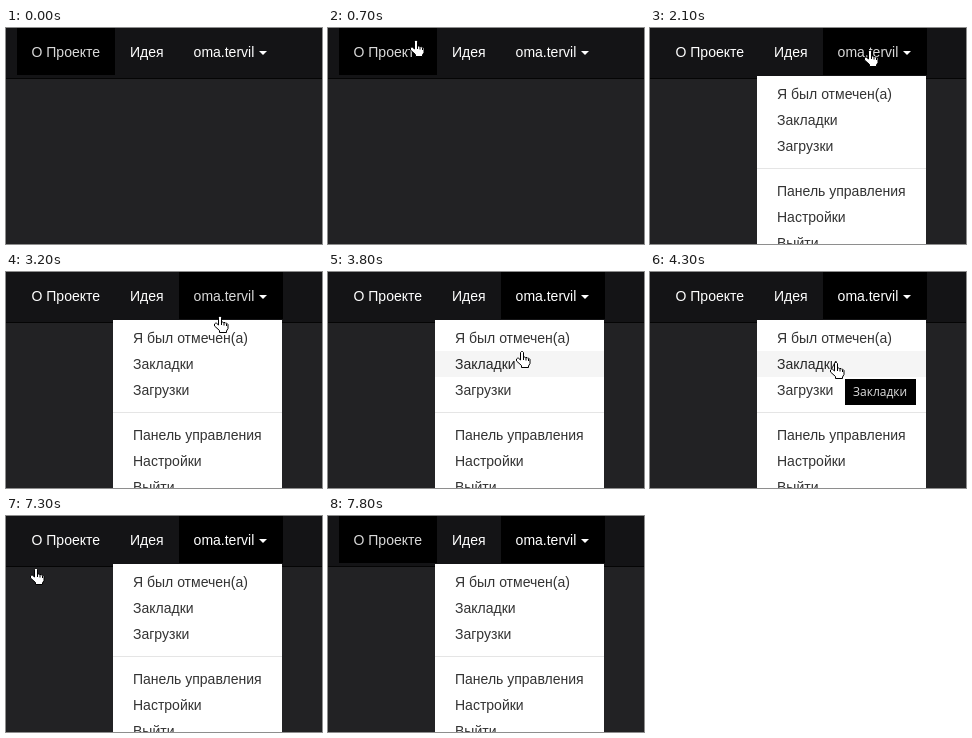
An HTML page for the animation above (8.2 s loop, 316 px wide and 216 px high).

```html
<!DOCTYPE html>
<html lang="ru">
<head>
<meta charset="utf-8">
<style>
html, body { margin: 0; width: 100%; height: 100%; overflow: hidden; background: #222224; }
svg { display: block; width: 100vw; height: 100vh; }
text { font: 14px "Liberation Sans", Arial, sans-serif; white-space: pre; }
.nav rect { fill: none; }
.nav text, .nav path { fill: #fff; }
.nav .on rect { fill: #000; }
.nav .hover text { fill: #d9d9d9; }
.menu rect { fill: #fff; }
.menu text { fill: #333; }
.menu .hover rect { fill: #f5f5f5; }
.menu .hover text { fill: #262626; }
#tip text { font: 12px "Open Sans", "Noto Sans", sans-serif; fill: #ddd; }
</style>
</head>
<body>
<svg viewBox="0 0 316 216">
  <rect width="316" height="50" fill="#141416"/>
  <rect y="50" width="316" height="1" fill="#050505"/>
  <g class="nav" id="nav"></g>
  <g class="menu" id="menu">
    <rect x="107" y="48" width="169" height="180"/>
    <path d="M107 140.5h169" stroke="#e5e5e5"/>
  </g>
  <g id="tip">
    <rect x="195" y="107" width="71" height="26"/>
    <text x="203" y="124">Закладки</text>
  </g>
  <g id="hand" stroke="#000">
    <path fill="#fff" d="M5.5 .5h1l1 1V6h1l1 .5H11l.7.7h1L14 8.5v4L12.5 15v1.5h-7v-2L.5 10V8l1-.8h1l2 1.8V1.5z"/>
    <path fill="none" d="M7.5 6v3M10 7v2.5M12.5 8v2"/>
  </g>
</svg>
<script>
const LOOP = 8200, STEP = 100, OPEN = 2100, TIP = 4300;
const $ = id => document.getElementById(id);

function addItem(parent, x, y, w, h, textX, baseline, label) {
  const g = document.createElementNS("http://www.w3.org/2000/svg", "g");
  g.innerHTML = `<rect x="${x}" y="${y}" width="${w}" height="${h}"/>
    <text x="${textX}" y="${baseline}">${label}</text>`;
  parent.append(g);
  return { g, has: (px, py) => px >= x && px < x + w && py < y + h && (py >= y || y === 0) };
}

const nav = [[11, 98, 25.5, "О Проекте"], [109, 64, 124, "Идея"], [173, 104, 187.6, "oma.tervil"]]
  .map(([x, w, textX, label]) => addItem($("nav"), x, 0, w, 47, textX, 29, label));
nav[2].g.insertAdjacentHTML("beforeend", '<path d="M253 23h8l-4 4z"/>');

const rows = [[53, "Я был отмечен(а)"], [79, "Закладки"], [105, "Загрузки"],
  [150, "Панель управления"], [176, "Настройки"], [202, "Выйти"]]
  .map(([y, label]) => addItem($("menu"), 107, y, 169, 26, 127, y + 18, label));

// Pointer route: time, x, y
const route = [
  [0, 34, -20], [400, 34, -20], [500, 40, -8], [700, 82, 12], [900, 140, 26],
  [1100, 190, 27], [1300, 214, 22], [2700, 214, 22], [2800, 213, 22], [2900, 213, 22],
  [3200, 208, 44], [3800, 188, 79], [4100, 180, 90], [6800, 180, 90], [6900, 141, 95],
  [7000, 100, 92], [7200, 38, 70], [7400, 10, 34], [7500, 12, 16], [7600, 22, 0],
  [7700, 34, -12], [7800, 34, -20], [LOOP, 34, -20]
];

function pointerAt(t) {
  const i = route.findIndex(p => p[0] > t);
  const [t0, x0, y0] = route[i - 1], [t1, x1, y1] = route[i];
  const k = (t - t0) / (t1 - t0);
  return [Math.round(x0 + (x1 - x0) * k), Math.round(y0 + (y1 - y0) * k)];
}

function draw(now) {
  const t = Math.floor(now % LOOP / STEP) * STEP;
  const [x, y] = pointerAt(t), open = t >= OPEN;
  const over = item => item.has(x + 6, y);

  nav.forEach((item, i) => {
    const hover = over(item);
    item.g.classList.toggle("hover", hover);
    item.g.classList.toggle("on", hover || open && i === 2);
  });
  rows.forEach(item => item.g.classList.toggle("hover", open && over(item)));
  $("menu").style.display = open ? "" : "none";
  $("tip").style.display = t >= TIP && over(rows[1]) ? "" : "none";
  $("hand").setAttribute("transform", `translate(${x} ${y})`);
}

const start = performance.now();
function frame() {
  draw(performance.now() - start);
  requestAnimationFrame(frame);
}
frame();
</script>
</body>
</html>
```
